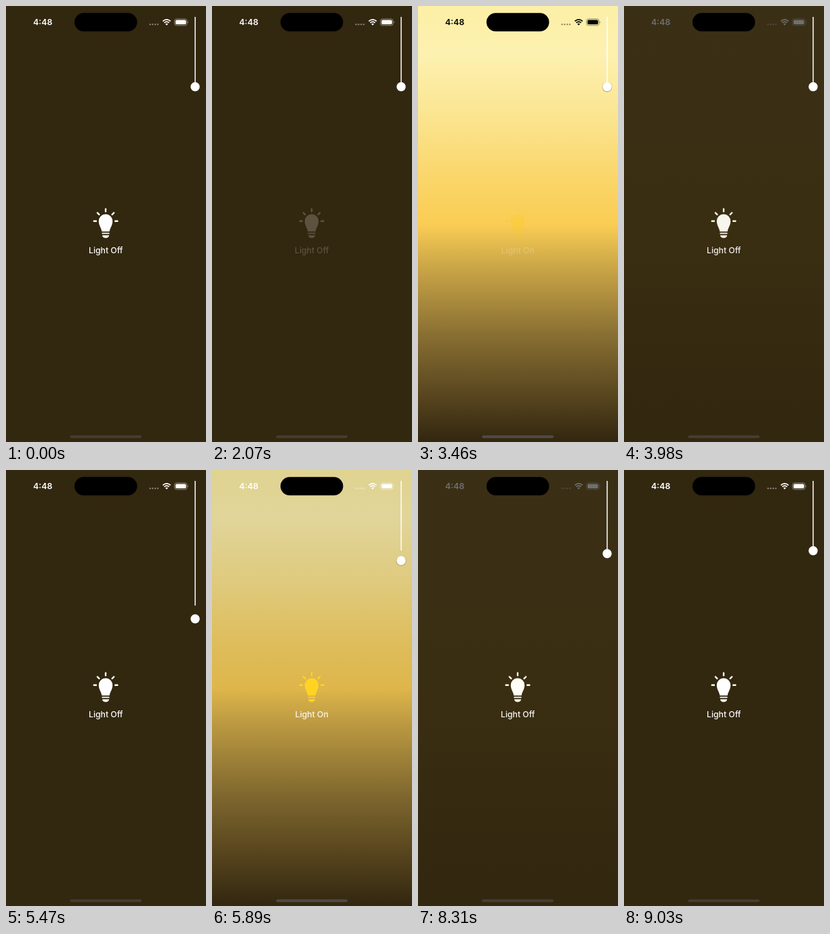
These frames come from a looping animation (295x640 px, 9.99 s). An HTML page:

```html
<!DOCTYPE html>
<html lang="en">
<head>
<meta charset="utf-8">
<title>Light switch</title>
<style>
  html, body { margin: 0; width: 100%; height: 100%; overflow: hidden; background: #32270f; }
  svg { display: block; width: 100%; height: 100%; }
  text { font-family: Inter, sans-serif; }
  #label { font-size: 12.2px; font-weight: 500; fill: #fff; text-anchor: middle; }
  #clock { font-size: 12.4px; font-weight: 600; text-anchor: middle; }
</style>
</head>
<body>
<svg viewBox="0 0 295 640">
  <defs>
    <linearGradient id="glow" x2="0" y2="1">
      <stop offset="0" stop-color="#fcefa6"/>
      <stop offset=".11" stop-color="#fdf1b0"/>
      <stop offset=".25" stop-color="#fbe591"/>
      <stop offset=".4" stop-color="#fad568"/>
      <stop offset=".5" stop-color="#facd54"/>
      <stop offset=".58" stop-color="#d3ad4a"/>
      <stop offset=".75" stop-color="#8a7033"/>
      <stop offset="1" stop-color="#32260f"/>
    </linearGradient>
  </defs>

  <rect width="295" height="640" fill="#32270f"/>
  <rect id="light" width="295" height="640" fill="url(#glow)"/>

  <g id="button">
    <g id="bulb">
      <path d="M141.3 331C140.8 326 136.8 322.5 136.8 315.8A10.2 10.2 0 0 1 157.2 315.8C157.2 322.5 153.2 326 152.7 331Z"/>
      <path d="M142 336.4H152C152 341.8 142 341.8 142 336.4Z"/>
      <g fill="none" stroke-linecap="round">
        <path stroke-width="1.8" d="M142.2 333.7H151.8"/>
        <path stroke-width="2.4" d="M147 298V301.6M129.7 315.8H133M161.1 315.8H164.4M134.8 303.5L137.4 306.1M159.2 303.5L156.6 306.1"/>
      </g>
    </g>
    <g id="label">
      <text id="off" x="147.3" y="363.3">Light Off</text>
      <text id="on" x="147.3" y="363.3">Light On</text>
    </g>
  </g>

  <g id="status">
    <text id="clock" x="54.3" y="28.4">4:48</text>
    <g opacity=".38">
      <circle cx="212.5" cy="27" r="1.3"/>
      <circle cx="216.3" cy="27" r="1.3"/>
      <circle cx="220.1" cy="27" r="1.3"/>
      <circle cx="223.9" cy="27" r="1.3"/>
    </g>
    <path fill="none" stroke-width="1.8" d="M231.3 22.4Q237 17.4 242.7 22.4M233.4 24.7Q237 21.5 240.6 24.7"/>
    <path d="M235 26.3Q237 24.7 239 26.3L237 28.4Z"/>
    <rect x="248.5" y="19" width="18.6" height="9.6" rx="3" fill="none" stroke-opacity=".45"/>
    <rect x="250" y="20.5" width="15.6" height="6.6" rx="1.8" stroke="none"/>
    <path d="M268.4 22.2Q270.2 23.8 268.4 25.4Z" opacity=".5"/>
  </g>
  <rect x="101" y="10.2" width="92.4" height="27" rx="13.5"/>
  <rect id="home" x="94.5" y="630.2" width="105.5" height="4" rx="2"/>

  <path id="cord" stroke="#fff" stroke-width="1.5"/>
  <g id="knob">
    <circle id="shade" r="7.4" cy=".6" fill="#5a4510"/>
    <circle r="6.7" fill="#fff"/>
  </g>
</svg>
<script>
const LOOP = 9990, FADE = 400, PULL = 104, REST = 118.5;
const toggles = [2190, 3630, 5585, 7960];
const taps = [[2070, 2190], [3460, 3630]];
const pulls = [[4960, 5585], [7150, 7960]];

const part = id => document.getElementById(id);
const clamp = x => Math.min(1, Math.max(0, x));
const ease = x => (x = clamp(x), x * x * (3 - 2 * x));
const set = (id, attrs) => {
  for (const name in attrs) part(id).setAttribute(name, attrs[name]);
};
const mix = (a, b, k) => `rgb(${a.map((v, i) => Math.round(v + (b[i] - v) * k))})`;

// Level of an on/off value that alternates at every toggle
const level = (t, delay, length) => toggles.reduce(
  (sum, start, i) => sum + (i % 2 ? -1 : 1) * ease((t - start - delay) / length), 0);

function buttonOpacity(t) {
  for (const [down, up] of taps) {
    if (t >= down && t < up + FADE) return 0.2 + 0.8 * ease((t - up) / FADE);
  }
  return 1;
}

function knobOffset(t) {
  return pulls.reduce((sum, [grab, release]) => sum + PULL *
    Math.sin(clamp((t - grab) / 620) * Math.PI / 2) *
    (1 - ease((t - release) / FADE)), 0);
}

function draw(t) {
  const light = level(t, 0, FADE);
  const bulb = mix([255, 255, 255], [255, 204, 0], light);
  const status = mix([255, 255, 255], [0, 0, 0], level(t, 310, 90));
  const offset = knobOffset(t);

  set('light', { opacity: light });
  set('button', { opacity: buttonOpacity(t) });
  set('bulb', { fill: bulb, stroke: bulb, 'stroke-width': 0 });
  set('off', { opacity: 1 - light });
  set('on', { opacity: light });
  set('status', { fill: status, stroke: status });
  set('clock', { stroke: 'none' });
  set('home', { fill: mix([68, 61, 51], [78, 75, 72], light) });
  set('cord', { d: `M279 16V${118 + Math.max(0, offset - 19)}` });
  set('knob', { transform: `translate(279 ${REST + offset})` });
  set('shade', { opacity: 0.35 * light });
}

// The stroke must not thicken the filled status shapes
document.querySelectorAll('#status circle, #status path:not([fill])')
  .forEach(shape => shape.setAttribute('stroke', 'none'));

const begin = performance.now();
function tick() {
  draw((performance.now() - begin) % LOOP);
  requestAnimationFrame(tick);
}
tick();
</script>
</body>
</html>
```
